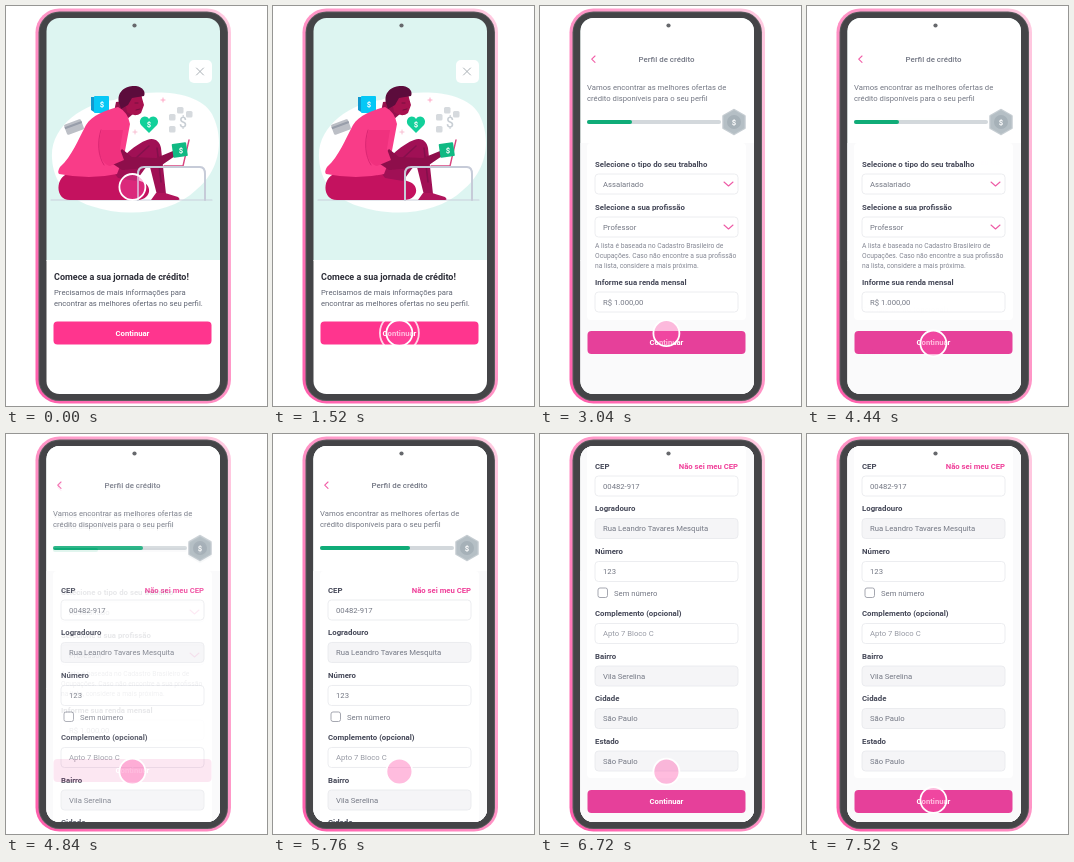
An HTML page that plays this animation: 261x400 px, repeating every 8 s.

```html
<!DOCTYPE html>
<html lang="pt-BR">
<head>
<meta charset="utf-8">
<title>Jornada de crédito</title>
<style>
  html, body { margin: 0; width: 100%; height: 100%; overflow: hidden; background: #fff; }
  svg { display: block; width: 100vw; height: 100vh; }
  text { font: 7.7px Roboto, Arial, sans-serif; fill: #5f6472; }
  .b { font-size: 7.8px; font-weight: 700; fill: #454858; }
  .title { font-size: 9px; font-weight: 700; fill: #2d2e38; }
  .head { font-size: 7.9px; font-weight: 500; fill: #737784; }
  .small { font-size: 6.75px; fill: #858894; }
  .value { fill: #747884; }
  .pale { fill: #979aa4; }
  .pink { font-weight: 700; fill: #f0409a; }
  .on { font-weight: 700; fill: #fff; }
  .coin { font-size: 14px; font-weight: 500; fill: #c9cfd5; }
  .line { fill: none; stroke-linecap: round; stroke-linejoin: round; }
</style>
</head>
<body>
<svg viewBox="0 0 261 400">
  <defs>
    <clipPath id="glass"><rect x="40.500" y="12" width="173.500" height="376" rx="13"/></clipPath>
    <linearGradient id="glow" x1="0" y1="1" x2="1" y2="0">
      <stop offset="0" stop-color="#ff5cab"/>
      <stop offset=".45" stop-color="#ff8cc2"/>
      <stop offset="1" stop-color="#ffcde2"/>
    </linearGradient>
  </defs>
  <rect x="29.500" y="2.500" width="195.500" height="395" rx="24" fill="url(#glow)"/>
  <rect x="32.500" y="5.500" width="189.500" height="389.500" rx="21" fill="#5b5b5e"/>
  <rect x="33.500" y="6.500" width="187.500" height="387.500" rx="20" fill="#444447"/>
  <g clip-path="url(#glass)">
    <g id="intro"></g>
    <g id="work"></g>
    <g id="address"></g>
    <g id="cursor">
      <circle id="ripple" fill="none" stroke="#fff" stroke-width="1.800"/>
      <circle r="13" fill="#ff4fa8" fill-opacity=".38" stroke="#fff" stroke-width="1.800"/>
    </g>
  </g>
  <circle cx="128.500" cy="19.500" r="2.100" fill="#66686c"/>
</svg>
<script>
const $ = id => document.getElementById(id);

// Text is placed by the middle of its line.
const text = (x, y, s, cls = '', anchor = 'start') =>
  `<text x="${x}" y="${y + 2.7}" class="${cls}" text-anchor="${anchor}">${s}</text>`;
const rect = (x, y, w, h, fill, r = 0, more = '') =>
  `<rect x="${x}" y="${y}" width="${w}" height="${h}" rx="${r}" fill="${fill}" ${more}/>`;
const path = (d, fill) => `<path d="${d}" fill="${fill}"/>`;
const line = (d, color, w = 1) =>
  `<path d="${d}" class="line" stroke="${color}" stroke-width="${w}"/>`;
const button = (y, fill) =>
  rect(47.5, y, 158, 23, fill, 4) + text(126.5, y + 11.5, 'Continuar', 'on', 'middle');
const box = (y, s, off, cls = 'value') =>
  rect(55, y - 10, 143, 20, off ? '#f5f5f7' : '#fff', 3.5, 'stroke="#e8e9ed" stroke-width=".8"') +
  text(63, y, s, cls);
const field = (y, label, s, off, cls) => text(55, y, label, 'b') + box(y + 20, s, off, cls);
const select = (y, label, s) =>
  field(y, label, s) + line(`M184 ${y + 18}l4.500 4 4.500-4`, '#ee5ba6', 1.1);

// The header is drawn around its progress bar at height y.
function header(y, done, panelEnd, end) {
  const knob = `M194 ${y - 12}l10.500 6v12l-10.500 6-10.500-6v-12z`;
  return rect(40, 12, 175, end - 12, '#fff') +
    rect(40, 137, 175, end - 137, '#fafafb') +
    rect(47, 137, 159, panelEnd - 137, '#fff', 4) +
    line(`M55 ${y - 66}l-3.300 3.200 3.300 3.200`, '#f25fa8', 1.1) +
    text(126.5, y - 63, 'Perfil de crédito', 'head', 'middle') +
    text(47, y - 35, 'Vamos encontrar as melhores ofertas de', 'value') +
    text(47, y - 23.5, 'crédito disponíveis para o seu perfil', 'value') +
    rect(47, y - 2, 134, 4, '#d3d8dc', 2) +
    rect(47, y - 2, done - 47, 4, '#10ac78', 2) +
    line(knob, '#c6cdd2', 2.5) + path(knob, '#b5bfc5') +
    `<circle cx="194" cy="${y}" r="7" fill="#a6b1b8"/>` +
    text(194, y, '$', 'on', 'middle');
}

const person =
  path('M46 152C44 120 78 97 108 94C130 84 190 80 206 108C222 140 208 170 190 184C165 208 120 212 85 200C60 192 47 175 46 152Z', '#fff') +
  line('M45 194H206', '#c9cfdc', 1.2) +
  // floating cards
  rect(88, 90, 15, 17, '#06c8f6', 1) + path('M85 91h3v15l-3-2z', '#1199cf') +
  text(96, 98, '$', 'on', 'middle') +
  `<g transform="rotate(-20 68 121)">${rect(59, 115.5, 18, 11, '#bcbfc6', 1.5) + rect(59, 118, 18, 2, '#989eaa')}</g>` +
  path('M143 127l-8-8C131 113 139 107 143 113C147 107 155 113 151 119Z', '#12d09a') +
  text(143, 118, '$', 'on', 'middle') +
  [[163, 108], [171, 101], [180, 105], [163, 120]]
    .map(([x, y]) => rect(x, y, 6.5, 6.5, '#d6dade', 1.5)).join('') +
  text(177, 118, '$', 'coin', 'middle') +
  line('M157 92v4M155 94h4', '#ff9fc0', .9) + line('M129 124v4M127 126h4', '#f7b0c8', .8) +
  // folded leg, raised leg and foot
  path('M62 168C50 170 48 194 64 194H132C146 193 147 178 134 175L112 166Z', '#c4125f') +
  path('M106 164C116 150 130 138 141 134C149 131 154 136 155 142L160 188L151 189L143 157L130 175L112 172Z', '#a01055') +
  line('M118 163L143 140M151 142L155 176', '#84104c', 1.6) +
  path('M150 187h9l13 4q3 3 0 3h-27z', '#b0145b') +
  // head
  path('M110 96L126 94L127 108L120 114L108 106Z', '#95104c') +
  path('M118 88C122 82 136 84 136 92L138 99L135 107Q129 112 121 106Z', '#a8124f') +
  path('M113 97C110 84 122 79 130 80C137 81 140 86 138 90L126 92L122 99L115 103Z', '#5c0c3c') +
  line('M129 97h3M130 104l4-1', '#6b0d3b', .8) +
  // shirt and arm
  path('M112 101C100 104 86 109 80 119C72 134 66 150 54 161Q51 166 53 168Q84 174 111 168L118 150L124 118Q122 106 112 101Z', '#f93c88') +
  path('M104 156L116 143L126 151L150 152L167 145L172 148L153 161L116 164Z', '#8e0e4b') +
  path('M96 124C90 140 94 158 104 160L118 154L114 143L117 124Z', '#f0317e') +
  line('M95 124C91 136 92 150 98 159', '#d2206c', .8) +
  // laptop
  line('M158 160H177L183 134', '#d8447f', 1.4) +
  `<g transform="rotate(-8 174 144)">${rect(166.5, 137, 14.5, 14, '#10b983', 1)}</g>` +
  text(175, 144, '$', 'on', 'middle') +
  line('M132 194V168Q132 161 138 161H194Q199 161 199 168V194', '#c6cbd8', 2);

$('intro').innerHTML =
  rect(40, 12, 175, 243, '#ddf5f1') + person + rect(40, 254, 175, 135, '#fff') +
  rect(183, 54, 23, 23, '#fff', 5) +
  line('M190.500 62l7 7M197.500 62l-7 7', '#aab1b6', 1) +
  text(48, 271, 'Comece a sua jornada de crédito!', 'title') +
  text(48, 286, 'Precisamos de mais informações para') +
  text(48, 297, 'encontrar as melhores ofertas no seu perfil.') +
  button(315.5, '#ff358e');

$('work').innerHTML =
  header(116, 92, 314, 388) +
  select(158, 'Selecione o tipo do seu trabalho', 'Assalariado') +
  select(201, 'Selecione a sua profissão', 'Professor') +
  text(55, 239, 'A lista é baseada no Cadastro Brasileiro de', 'small') +
  text(55, 249, 'Ocupações. Caso não encontre a sua profissão', 'small') +
  text(55, 259, 'na lista, considere a mais próxima.', 'small') +
  field(276, 'Informe sua renda mensal', 'R$ 1.000,00') +
  button(325, '#e6409a');

$('address').innerHTML =
  header(114, 137, 468, 514) +
  field(156, 'CEP', '00482-917') +
  text(198, 156, 'Não sei meu CEP', 'pink', 'end') +
  field(198.500, 'Logradouro', 'Rua Leandro Tavares Mesquita', true) +
  field(241.500, 'Número', '123') +
  rect(58, 278, 9.500, 9.500, '#fff', 2, 'stroke="#9b9da8" stroke-width=".9"') +
  text(74, 283, 'Sem número', 'value') +
  field(303.500, 'Complemento (opcional)', 'Apto 7 Bloco C', false, 'pale') +
  field(346, 'Bairro', 'Vila Serelina', true) +
  field(388.500, 'Cidade', 'São Paulo', true) +
  field(431, 'Estado', 'São Paulo', true) +
  button(480, '#e6409a');

const part = (t, from, to) => Math.min(1, Math.max(0, (t - from) / (to - from)));
const quart = p => p < .5 ? 8 * p ** 4 : 1 - 8 * (1 - p) ** 4;
const smooth = p => p * p * (3 - 2 * p);
const glide = (t, from, to) => quart(part(t, from, to));

const taps = [[1350, 1640], [3680, 3840], [7400, 7520]];

function draw() {
  const t = performance.now() % 8000;

  $('work').setAttribute('transform', `translate(${120 * (1 - glide(t, 1340, 2160))} 0)`);
  $('work').setAttribute('opacity', smooth(part(t, 1560, 2160)));
  $('address').setAttribute('transform', `translate(0 ${-124 * glide(t, 5740, 6560)})`);
  $('address').setAttribute('opacity', smooth(part(t, 4420, 4960)));

  const y = 181 + 146 * glide(t, 500, 1320) + 10.500 * glide(t, 2860, 3680) +
    28.500 * glide(t, 6580, 7400);
  $('cursor').setAttribute('transform', `translate(126.400 ${y})`);

  const tap = taps.find(([a, b]) => t > a && t < b);
  const p = tap ? part(t, ...tap) : 0;
  $('ripple').setAttribute('r', 13 + 11 * p);
  $('ripple').setAttribute('opacity', tap ? 1 - p ** 3 : 0);

  requestAnimationFrame(draw);
}
draw();
</script>
</body>
</html>
```
